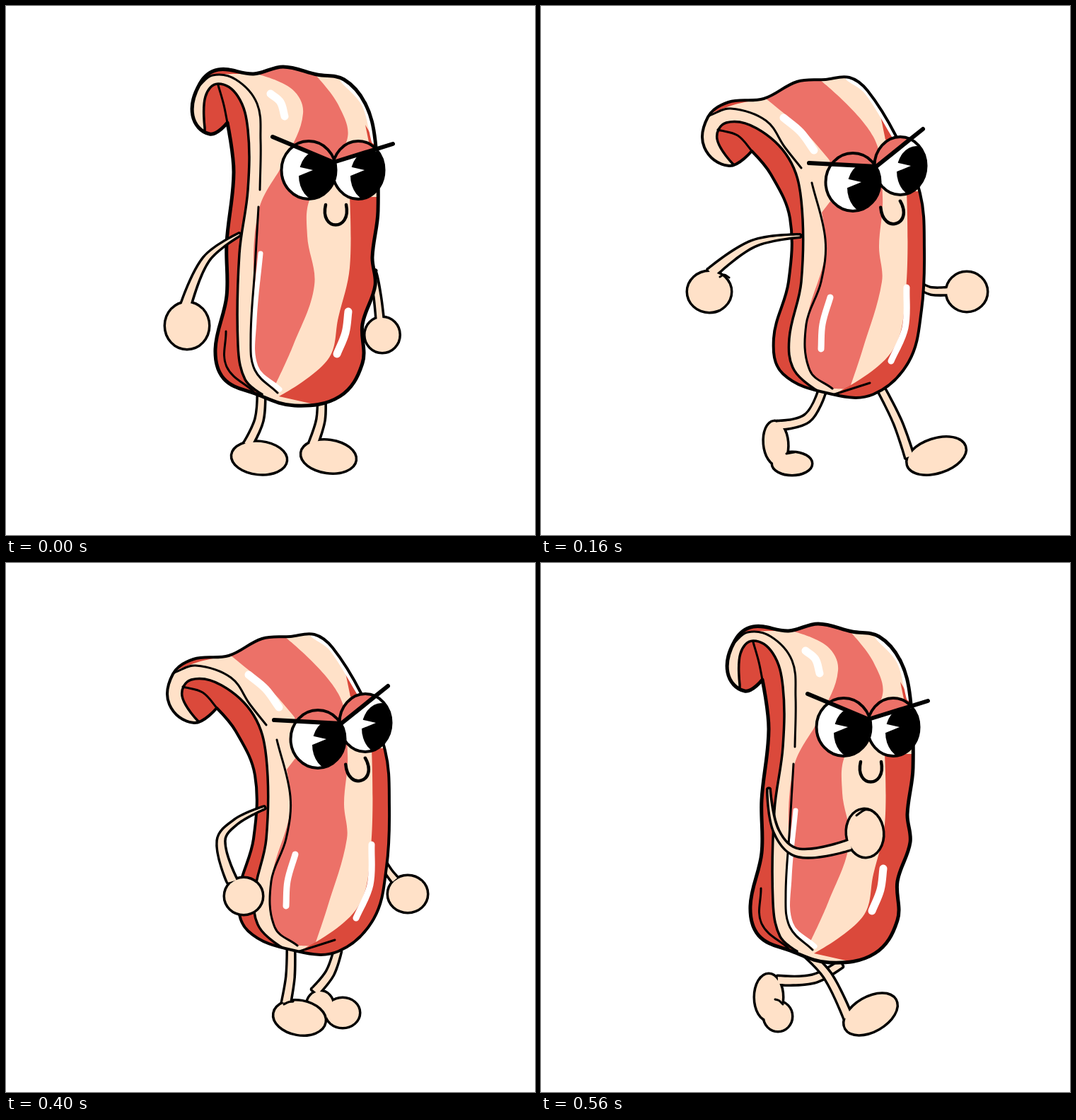
An HTML page that plays this animation: 748x748 px, repeating every 0.64 s.

```html
<!DOCTYPE html>
<html lang="en">
<head>
<meta charset="utf-8">
<title>Walking bacon</title>
<style>
html, body { margin: 0; width: 100%; height: 100%; overflow: hidden; background: #fff; }
svg { display: block; width: 100%; height: 100%; }
</style>
</head>
<body>
<svg id="stage" viewBox="0 0 748 748" fill="none" stroke-linecap="round" stroke-linejoin="round"></svg>
<script>
const CREAM = '#ffe1c8', PINK = '#ec7168', RED = '#db493b', CRIMSON = '#db4142';
const STEP = 80;

// "x y" pairs; a trailing ! marks a corner
const points = text => [...text.matchAll(/([\d.]+) ([\d.]+)(!?)/g)]
  .map(([, x, y, mark]) => ({ x: +x, y: +y, sharp: mark === '!' }));

// Smooth path through the points
function curve(p, closed) {
  const n = p.length;
  const at = i => closed ? p[(i + n) % n] : p[Math.min(n - 1, Math.max(0, i))];
  const handle = (i, reach) => {
    const q = at(i), a = at(i - 1), b = at(i + 1);
    const k = q.sharp ? 0 : reach * 0.36 / (Math.hypot(b.x - a.x, b.y - a.y) || 1);
    return `${(q.x + (b.x - a.x) * k).toFixed(1)} ${(q.y + (b.y - a.y) * k).toFixed(1)}`;
  };
  let d = `M${p[0].x} ${p[0].y}`;
  for (let i = 0; i < (closed ? n : n - 1); i++) {
    const a = at(i), b = at(i + 1), len = Math.hypot(b.x - a.x, b.y - a.y);
    d += `C${handle(i, len)} ${handle(i + 1, -len)} ${b.x} ${b.y}`;
  }
  return d + (closed ? 'Z' : '');
}
const open = text => curve(points(text), false);
const loop = text => curve(points(text), true);

const fill = (d, color) => `<path d="${d}" fill="${color}"/>`;
const line = (d, width, color = '#000') => `<path d="${d}" stroke="${color}" stroke-width="${width}"/>`;
const crease = text => line(open(text), 3);

// Outline of a bone whose half width goes from w0 to w1
function taper(text, w0, w1) {
  const bone = points(text), last = bone.length - 1;
  const edge = side => bone.map((q, i) => {
    const a = bone[Math.max(0, i - 1)], b = bone[Math.min(last, i + 1)];
    const k = side * (w0 + (w1 - w0) * i / last) / Math.hypot(b.x - a.x, b.y - a.y);
    return { x: q.x - (b.y - a.y) * k, y: q.y + (b.x - a.x) * k, sharp: i === 0 || i === last };
  });
  return curve([...edge(1), ...edge(-1).reverse()], true);
}

function limb(bone, w0, w1, blobs) {
  const parts = `<path d="${taper(bone, w0, w1)}"/>` + blobs.map(b => {
    const [x, y, rx, ry, turn = 0] = b.split(' ');
    return `<ellipse cx="${x}" cy="${y}" rx="${rx}" ry="${ry}" transform="rotate(${turn} ${x} ${y})"/>`;
  }).join('');
  return `<g fill="#000" stroke="#000" stroke-width="7">${parts}</g><g fill="${CREAM}">${parts}</g>`;
}
const arm = (bone, ...blobs) => limb(bone, 0.5, 6, blobs);
const farArm = (bone, ...blobs) => limb(bone, 3, 4, blobs);
const leg = (bone, ...blobs) => limb(bone, 4, 5, blobs);

function eye(x, y, rx, gaze, brow, id) {
  const oval = `<ellipse cx="${x}" cy="${y}" rx="${rx}" ry="41"`;
  const px = x + gaze;
  return `<clipPath id="${id}">${oval}/></clipPath>${oval} fill="#fff"/>
    <g clip-path="url(#${id})">
      <ellipse cx="${px + 14}" cy="${y + 8}" rx="28" ry="36" fill="#000"/>
      ${fill(`M${px - 16} ${y - 5}L${px + 6} ${y}L${px - 16} ${y + 9}Z`, '#fff')}
      ${fill(`M${brow}V100H370Z`, PINK)}
    </g>${oval} stroke="#000" stroke-width="4"/>`;
}

function face(x, y, x2, y2, gaze, brow, mouth, tilt) {
  return `<g transform="translate(${mouth}) rotate(${tilt})">
      <path d="M-13 -14C-22 24 24 24 16 -14" fill="${CREAM}" stroke="#000" stroke-width="4.5"/></g>`
    + eye(x2, y2, 36.5, gaze + 3, brow, 'eyeR') + eye(x, y, 38.5, gaze, brow, 'eyeL')
    + line('M' + brow, 6);
}

const stripe = text => fill(loop(text), PINK);
const shine = (text, width) => line(open(text), width, '#fff');
const tip = (at, tint) => fill(`M${at}l20 34h-13z`, tint);
const rightMeat = (text, tint) => fill(open(text) + `L600 600V${points(text)[0].y}Z`, tint);

function skin(out, side, tint, weight, marks, details) {
  const rim = points(out), shape = curve(rim, true);
  const flank = open(side) + 'L280 580V300Z';
  return `<clipPath id="skin"><path d="${shape}"/></clipPath>
    <g clip-path="url(#skin)">${fill(shape, CREAM)}${marks}
    ${line(curve(rim.slice(7, 10)), 11, '#fff')}${fill(flank, tint)}${line(flank, 3.5)}${details}</g>
    ${line(shape, weight)}`;
}

const uprightMarks =
  stripe('358 97! 405 118 420 152 396 215 357 290 350 420 352 515 380 537! 406 480 436 395 426 325 430 272 482 190 470 140 436 96! 395 80') +
  rightMeat('486 270! 486 370 470 440 455 500 386 552!', RED) + tip('508 168', RED) +
  fill(loop('268 118! 300 86 352 97! 290 99'), RED) +
  shine('374 124 388 136 394 156', 11) + shine('484 432 480 462 468 492', 11) +
  shine('360 350 351 445 353 510 387 542', 7);
const uprightLines = crease('300 112 308 140 313 165') +
  crease('271 115 292 98 325 104 355 138 360 190 359 260') +
  crease('357 284 352 370 346 470 352 515 384 547') + crease('311 460 312 510 350 545');
const upright = skin(
  '288 181 264 155 274 110 300 90 350 96 392 86 440 97 478 104 508 138 522 190 526 290 518 355 522 395 504 450 504 505 472 552 408 565 352 548 308 527 296 485 312 410 312 335 322 235 313 165!',
  '281 172! 282 128 300 110 328 128 342 175 342 260 330 350 328 480 338 528 362 549!',
  RED, 5, uprightMarks, uprightLines) +
  face(428, 232, 498, 232, 0, '377 185 463 221 547 195', '465 295', 0);

const turnedMarks =
  stripe('416 98! 428 150 424 202 373 254! 372 320 352 450 360 525 408 550! 401 475 424 360 450 272 486 200 482 114!') +
  rightMeat('514 262! 508 370 500 460 478 515 430 552!', CRIMSON) +
  fill(loop('312 113! 345 104 382 95! 350 109'), CRIMSON) +
  shine('374 138 383 158 388 182', 9) + shine('390 430 391 475 402 517', 9) +
  shine('500 435 496 465 481 503', 6);
const turnedLines = crease('306 133 318 160 324 182') +
  crease('277 145 298 118 330 120 362 152 372 195 373 262') +
  crease('374 280 366 370 352 460 360 520 402 545');
const turned = skin(
  '296 197 274 165 285 124 312 110 360 103 390 97 418 101 480 114 512 145 525 185 532 280 533 365 520 425 518 500 490 538 425 552 360 541 322 515 314 455 340 360 347 280 342 235 322 180!',
  '294 196! 287 160 303 133 335 137 356 180 359 260 354 340 338 440 340 508 378 543!',
  CRIMSON, 4, turnedMarks, turnedLines) +
  face(449, 230, 519, 222, 3, '394 189 484 214 562 180', '493 288', -8);

const bentMarks =
  stripe('318 131! 370 175 408 218! 420 262! 397 292! 402 350 376 445 380 515 412 541! 436 542! 455 485 482 390 478 340 483 270 470 185 395 105! 350 100') +
  rightMeat('517 262! 516 400 495 490 412 550!', RED) + tip('480 155', RED) +
  fill(loop('240 152! 268 131 318 131! 275 139'), RED) +
  shine('343 158 367 178 386 204', 11) + shine('409 412 398 450 396 485', 9) +
  shine('517 398 515 455 495 502', 9);
const bentLines = crease('250 175 278 183 299 206') +
  crease('238 155 268 145 318 162 345 200 368 229') +
  crease('383 250 402 330 396 390 375 450 380 515 412 541') + crease('415 549 465 533');
const bent = skin(
  '266 226 231 200 236 157 265 136 315 131 362 107 402 104 436 101 462 120 502 184 536 265 542 345 538 430 520 503 470 549 412 549 342 520 329 470 350 390 352 300 325 238 298 205!',
  '272 224! 249 188 262 165 305 173 350 215 368 275 368 390 351 470 358 515 394 546!',
  RED, 4, bentMarks, bentLines) +
  face(441, 249, 508, 226, 6, '379 222 474 227 540 174', '497 294', -18);

const leaningMarks =
  stripe('328 131! 370 180 415 204! 414 262 427 310 428 390 402 485 415 540! 440 545! 462 475 487 380 485 320 500 255 480 172 412 103! 380 98') +
  rightMeat('532 240! 530 320 536 390 515 480 420 551!', RED) + tip('500 146', RED) +
  shine('352 160 366 170 378 182', 11) + shine('519 467 511 490 498 510', 8) +
  shine('432 353 426 405 393 475 415 535', 7);
const leaningLines = crease('272 164 290 184 301 204') +
  crease('235 158 265 142 315 153 365 195 412 262 427 325 424 385 392 465 390 510 410 536') +
  crease('355 450 340 485 347 525') + crease('418 548 444 543');
const leaning = skin(
  '268 221 231 195 238 158 270 137 330 131 362 112 408 101 435 97 465 118 505 148 524 176 560 262 568 340 560 420 530 500 490 543 440 553 365 540 328 505 330 462 370 395 372 320 331 245 301 203!',
  '270 220! 254 188 268 166 320 185 380 250 402 335 390 420 370 480 375 520 398 547!',
  CRIMSON, 4, leaningMarks, leaningLines) +
  face(449, 233, 516, 214, 5, '388 203 483 213 552 165', '503 281', -15);

const poses = [];
const pose = (...layers) => poses.push(layers.join(''));
const restingArm = farArm('524 395 529 420 531 445', '541 464 17 23');

pose(
  farArm('519 375 525 410 529 446', '532 465 23.5 24'),
  leg('446 550 445 585 434 620', '456 637 38 22 8'),
  leg('361 545 358 585 342 620', '358 639 38 22 6'),
  upright,
  arm('330 323 283 358 254 424', '256 452 30 32'));
pose(
  restingArm,
  leg('458 545 478 580 489 630', '525 634 42 24 -12'),
  leg('380 543 358 580 318 602', '331 629 42 27 30'),
  turned,
  arm('356 322 292 355 253 424', '260 452 32 29 -15'), crease('284 453 280 460 281 467'));
pose(
  farArm('538 397 552 403 577 403', '602 404 28 27'),
  leg('481 542 504 588 521 637', '559 636 42 23 -18'),
  leg('397 546 376 583 335 593', '332 618 16 30 -5', '355 647 27 15'), crease('347 633 358 631'),
  bent,
  arm('366 325 300 336 240 378', '238 404 30 28'), crease('253 383 259 380 266 384'));
pose(
  farArm('555 401 570 406 594 405', '619 405 28 27'),
  leg('475 547 497 590 512 638', '546 640 42 23 -15'),
  leg('394 545 374 582 334 597', '328 620 16 30 -5', '352 651 26 15 5'),
  leaning,
  arm('384 345 310 352 262 388', '257 415 29 29'));
pose(
  farArm('556 411 566 418 580 425', '602 431 27 30'), crease('612 402 612 418 600 417'),
  leg('470 548 485 580 492 630', '521 640 38 22 -8'),
  leg('394 545 378 580 342 599', '331 625 17 29 -15', '351 648 27 18 10'), crease('345 627 358 628'),
  leaning,
  arm('386 346 330 364 297 402', '286 432 31 28 -30'), crease('309 430 310 436 307 442'));
pose(
  farArm('534 425 542 438 550 448', '568 468 27 25'),
  leg('469 548 458 580 437 606', '444 626 18 20', '476 636 23 20'),
  leg('403 545 402 585 396 622', '415 643 36 23 10'), crease('393 624 399 621 406 620'),
  bent,
  arm('365 346 325 366 304 393 320 450', '336 471 26 25'));
pose(
  restingArm,
  leg('459 545 432 582 393 598', '384 620 17 28 -8', '398 645 24 15'),
  leg('390 543 402 585 410 628', '437 640 38 22 -5'),
  turned,
  arm('356 322 326 366 336 418 390 448', '410 448 25 26'));
pose(
  leg('424 567 385 588 335 590', '322 614 19 32', '335 641 19 20'), crease('331 617 337 619 342 624'),
  leg('371 548 405 583 434 642', '466 638 40 23 -30'),
  upright,
  arm('322 320 333 380 365 410 438 398', '458 382 25 33 -5'), crease('446 357 458 349 468 350'));

const stage = document.getElementById('stage');
const start = performance.now();
let shown = -1;

function draw(now) {
  const i = Math.floor(Math.max(0, now - start) / STEP) % poses.length;
  if (i !== shown) stage.innerHTML = poses[shown = i];
  requestAnimationFrame(draw);
}
draw(start);
</script>
</body>
</html>
```
